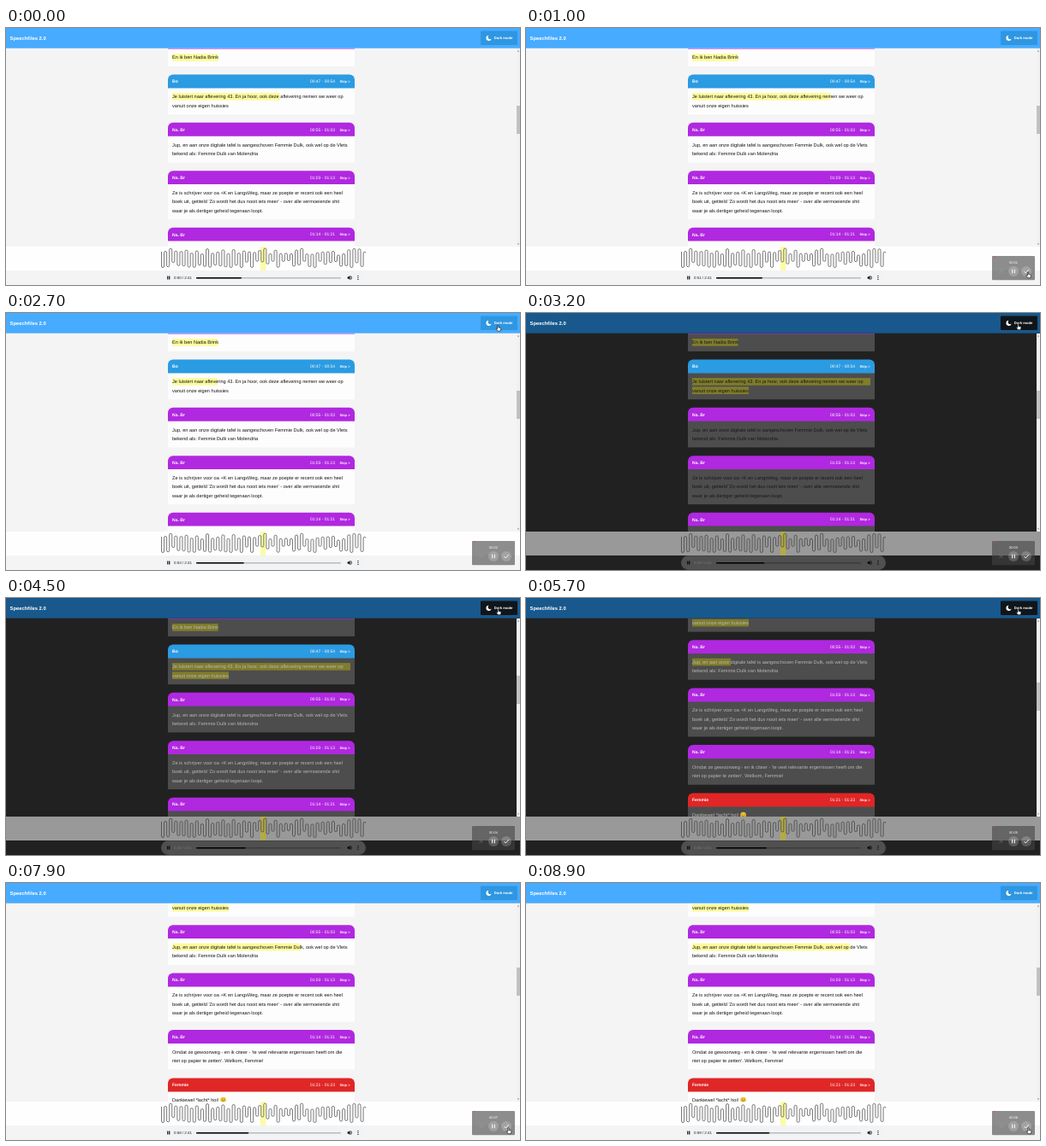
Animation, 600 px wide and 301 px high, one loop 9000 ms. Source, as an HTML page:

```html
<!DOCTYPE html>
<html lang="nl">
<head>
<meta charset="utf-8">
<style>
  html, body { margin: 0; width: 100%; height: 100%; overflow: hidden; }
  svg { display: block; width: 600px; height: 301px; background: var(--page);
    font-family: "Liberation Sans", Arial, sans-serif; text-rendering: geometricPrecision; }
  text { white-space: pre; }
  .b { font-weight: bold; }
  .w { fill: #fff; }
  .body { fill: var(--text); font-size: 5.62px; }
  .mark { fill: var(--mark); }
</style>
</head>
<body>
<svg id="stage" viewBox="0 0 600 301">
  <defs>
    <clipPath id="view"><rect y="23.7" width="600" height="232.3"/></clipPath>
    <clipPath id="waveBox"><rect x="181" y="256" width="239" height="28"/></clipPath>
  </defs>

  <g clip-path="url(#view)"><g id="cards"></g></g>

  <rect x="596" y="24" width="4" height="232" fill="#f1f1f1"/>
  <rect id="thumb" x="596" width="4" height="33" fill="#c1c1c1"/>
  <path d="M597 27.5l1-1.3 1 1.3zM597 252.5l1 1.3 1-1.3z" fill="#555"/>

  <rect width="600" height="23.7" fill="var(--bar)"/>
  <text class="b w" x="4.6" y="13.9" font-size="5.83">Speechfiles 2.0</text>
  <rect x="554" y="3.5" width="43" height="16.5" rx="1" fill="var(--button)"/>
  <path class="w" d="M563.4 8.8a3.1 3.1 0 1 0 3.2 3.6a1.9 1.9 0 1 1-3.2-3.6z"/>
  <text class="b w" x="569.8" y="13.4" font-size="4.2">Dark mode</text>

  <rect y="256" width="600" height="28" fill="var(--strip)"/>
  <rect x="297" y="256" width="6.3" height="28" fill="var(--head)"/>
  <path id="wave" clip-path="url(#waveBox)" fill="none" stroke="#333" stroke-width=".65"/>

  <rect x="181" y="284.3" width="239" height="16.4" rx="8.2" fill="var(--pill)"/>
  <path d="M188.2 290.5h1.1v4h-1.1zM190.2 290.5h1.1v4h-1.1z"/>
  <text id="clock" x="196" y="294.2" font-size="4.45" fill="var(--clock)"></text>
  <rect x="222" y="292" width="169" height="1.4" rx=".6" fill="var(--rail)"/>
  <rect id="played" x="222" y="292" height="1.4" rx=".6"/>
  <path d="M398.6 291.6h1.2l1.6-1.5v4.8l-1.6-1.5h-1.2z"/>
  <path d="M402.1 291.2q1.2 1.3 0 2.6M402.4 290.1q2.6 2.4 0 4.8" fill="none" stroke="#000" stroke-width=".6"/>
  <path d="M410.4 290h1.1v1.1h-1.1zM410.4 292h1.1v1.1h-1.1zM410.4 294h1.1v1.1h-1.1z"/>

  <g id="recorder">
    <rect x="544" y="267" width="50" height="28.3" rx="1" fill="#444" opacity=".6"/>
    <rect x="544.5" y="267.3" width="4" height=".8" fill="#d0523c" opacity=".7"/>
    <text id="timer" class="w" x="569" y="275.6" font-size="4" text-anchor="middle"></text>
    <path d="M552.3 282.8l4.4 4.4m0-4.4l-4.4 4.4" stroke="#aaa" stroke-width=".7" opacity=".5"/>
    <circle cx="569" cy="285" r="6" fill="#fff" opacity=".2"/>
    <path class="w" d="M567.2 282.8h1v4.4h-1zM569.8 282.8h1v4.4h-1z"/>
    <circle cx="584" cy="285" r="6" fill="#fff" opacity=".2"/>
    <path d="M581.4 285l1.9 2 3.5-3.9" fill="none" stroke="#fff" stroke-width=".9"/>
  </g>

  <path id="arrow" d="M0 0v5.8l1.3-1.2 1 2.1.9-.4-1-2h1.8z" fill="#fff" stroke="#000" stroke-width=".6"/>
  <path id="hand" d="M-.6 0q.6-.7 1.2 0v2.4l2.5.7q.5.2.4.8l-.6 2.8h-3.2l-1.9-2.8q.4-.8 1.6.2z" fill="#fff" stroke="#000" stroke-width=".6"/>
</svg>

<script>
const $ = id => document.getElementById(id);
const stage = $('stage'), LOOP = 9;
const PURPLE = '#b028e0', BLUE = '#2b9be2', RED = '#e02626';
const LINE = 10.3;

const cards = [
  [9, 'Na. Br', '00:45 - 00:47', PURPLE, ['En ik ben Nadia Brink']],
  [55, 'Bo', '00:47 - 00:54', BLUE, [
    'Je luistert naar aflevering 43. En ja hoor, ook deze aflevering nemen we weer op',
    'vanuit onze eigen huissies']],
  [111.2, 'Na. Br', '00:55 - 01:03', PURPLE, [
    'Jup, en aan onze digitale tafel is aangeschoven Femmie Dulk, ook wel op de Vlets',
    'bekend als: Femmie Dulk van Molendria']],
  [167.6, 'Na. Br', '01:03 - 01:13', PURPLE, [
    'Ze is schrijver voor oa +K en LangsWeg, maar ze poepte er recent ook een heel',
    "boek uit, getiteld 'Zo wordt het dus nooit iets meer' - over alle vermoeiende shit",
    'waar je als dertiger geheid tegenaan loopt.']],
  [234.1, 'Na. Br', '01:14 - 01:21', PURPLE, [
    "Omdat ze gewoonweg - en ik citeer - 'te veel relevante ergernissen heeft om die",
    "niet op papier te zetten'. Welkom, Femmie!"]],
  [290.5, 'Femmie', '01:21 - 01:23', RED, ['Dankjewel *lacht* hoi!']]
];

const mark = (id, y, w = 0) =>
  `<rect id="${id}" class="mark" x="194" y="${y}" width="${w}" height="8.6"/>`;

function card([top, who, time, color, lines], i) {
  const marks = lines.map((_, n) => mark(`m${i}${n}`, top + 21.1 + n * LINE)).join('');
  const text = lines.map((s, n) =>
    `<text class="body" x="194" y="${top + 27.4 + n * LINE}">${s}</text>`).join('');
  return `<rect x="189" y="${top + 15}" width="218" height="${10.6 + lines.length * LINE}" fill="var(--card)"/>
    <path d="M189 ${top + 15.5}v-9.9a6 6 0 0 1 6-6h206a6 6 0 0 1 6 6v9.9z" fill="${color}"/>
    <text class="b w" x="194" y="${top + 9.4}" font-size="5.05">${who}</text>
    <text class="w" x="384" y="${top + 9.3}" font-size="4.95" text-anchor="end">${time}</text>
    <text class="b w" x="389.6" y="${top + 9.3}" font-size="4">Skip &gt;</text>${marks}${text}`;
}
$('cards').innerHTML = cards.map(card).join('') +
  `<circle cx="253.6" cy="315.6" r="3.3" fill="#f5c531"/>
   <path d="M251.8 314.7h1m1.6 0h1M251.8 316.3q1.8 2 3.6 0" fill="none" stroke="#5b4010" stroke-width=".6"/>`;
$('m00').setAttribute('width', 53.5);

// Meander with seeded peaks and valleys
let seed = 11;
const rnd = () => (seed = seed * 16807 % 2147483647) / 2147483647;
const R = 1.53;
let d = 'M181.5 262';
for (let x = 181.5; x < 420; x += 4 * R) {
  const valley = 280.5 - 8 * rnd() ** 2, peak = 259.5 + 8 * rnd();
  d += `V${valley - R}a${R} ${R} 0 0 0 ${2 * R} 0V${peak}a${R} ${R} 0 0 1 ${2 * R} 0`;
}
$('wave').setAttribute('d', d);

const ease = p => p * p * (3 - 2 * p);
const clamp = (v, a, b) => Math.min(b, Math.max(a, v));

// Piecewise track of [time, value]; equal times give a jump
function track(keys, t, curve = p => p) {
  const n = keys.findIndex(k => k[0] > t);
  if (n < 0) return keys[keys.length - 1][1];
  if (n === 0) return keys[0][1];
  const [t0, a] = keys[n - 1], [t1, b] = keys[n];
  return a + (b - a) * curve((t - t0) / (t1 - t0));
}

const themes = {
  light: { page: '#f4f4f4', bar: '#47abff', button: '#2f96e2', card: '#fdfdfd', mark: '#fdfb9c',
    strip: '#fefefe', head: '#fbfba6', pill: '#f1f3f4', clock: '#222', rail: '#b8babb' },
  dark: { page: '#212121', bar: '#19588c', button: '#10151a', card: '#4d4d4d', mark: '#807d2c',
    strip: '#999', head: '#b3ab45', pill: '#505050', clock: '#777', rail: '#3c3c3c' }
};
const firstMark = [[0, 126], [1.1, 165], [1.1, 0], [2, 30], [3.1, 66], [3.1, 274]];
const nextMark = [[4.6, 0], [5.7, 45], [6.6, 76], [7.9, 150], [8.9, 184]];
const cursorX = [[1, 586], [1.9, 573], [2.4, 573], [2.8, 574.5], [6.2, 574.5], [6.6, 561], [7, 561], [7.6, 586.5]];
const cursorY = [[1, 286], [1.9, 22.5], [2.4, 22.5], [2.8, 13], [6.2, 13], [6.6, 83], [7, 83], [7.6, 287]];
const scrollY = [[4.5, 0], [4.9, 61.6]];

function setMark(i, w) {
  $(`m${i}0`).setAttribute('width', clamp(w, 0, 208));
  $(`m${i}1`).setAttribute('width', clamp(w - 208, 0, 66));
}

function draw() {
  const t = performance.now() / 1000 % LOOP;
  const dark = t >= 3.1 && t < 6.1;
  const theme = themes[dark ? 'dark' : 'light'];
  for (const k in theme) stage.style.setProperty('--' + k, theme[k]);
  const grey = Math.round(track([[3.2, 24], [3.6, 182], [6.1, 182], [6.4, 24]], t));
  stage.style.setProperty('--text', `rgb(${grey},${grey},${grey})`);

  const scroll = track(scrollY, t, ease);
  $('cards').setAttribute('transform', `translate(0 ${-scroll})`);
  $('thumb').setAttribute('y', 91 + scroll * .13);
  setMark(1, track(firstMark, t));
  setMark(2, track(nextMark, t));

  const audio = 50.4 + t;
  $('clock').textContent = `0:${Math.floor(audio)} / 2:41`;
  $('played').setAttribute('width', audio / 161 * 169);

  const live = t >= .1;
  $('recorder').style.display = live ? '' : 'none';
  $('timer').textContent = '00:0' + Math.floor(t);
  const x = track(cursorX, t, ease), y = track(cursorY, t, ease);
  const overButton = y < 20 || y > 279;
  for (const [id, on] of [['arrow', !overButton], ['hand', overButton]]) {
    $(id).style.display = live && on ? '' : 'none';
    $(id).setAttribute('transform', `translate(${x} ${y})`);
  }
  requestAnimationFrame(draw);
}
draw();
</script>
</body>
</html>
```
